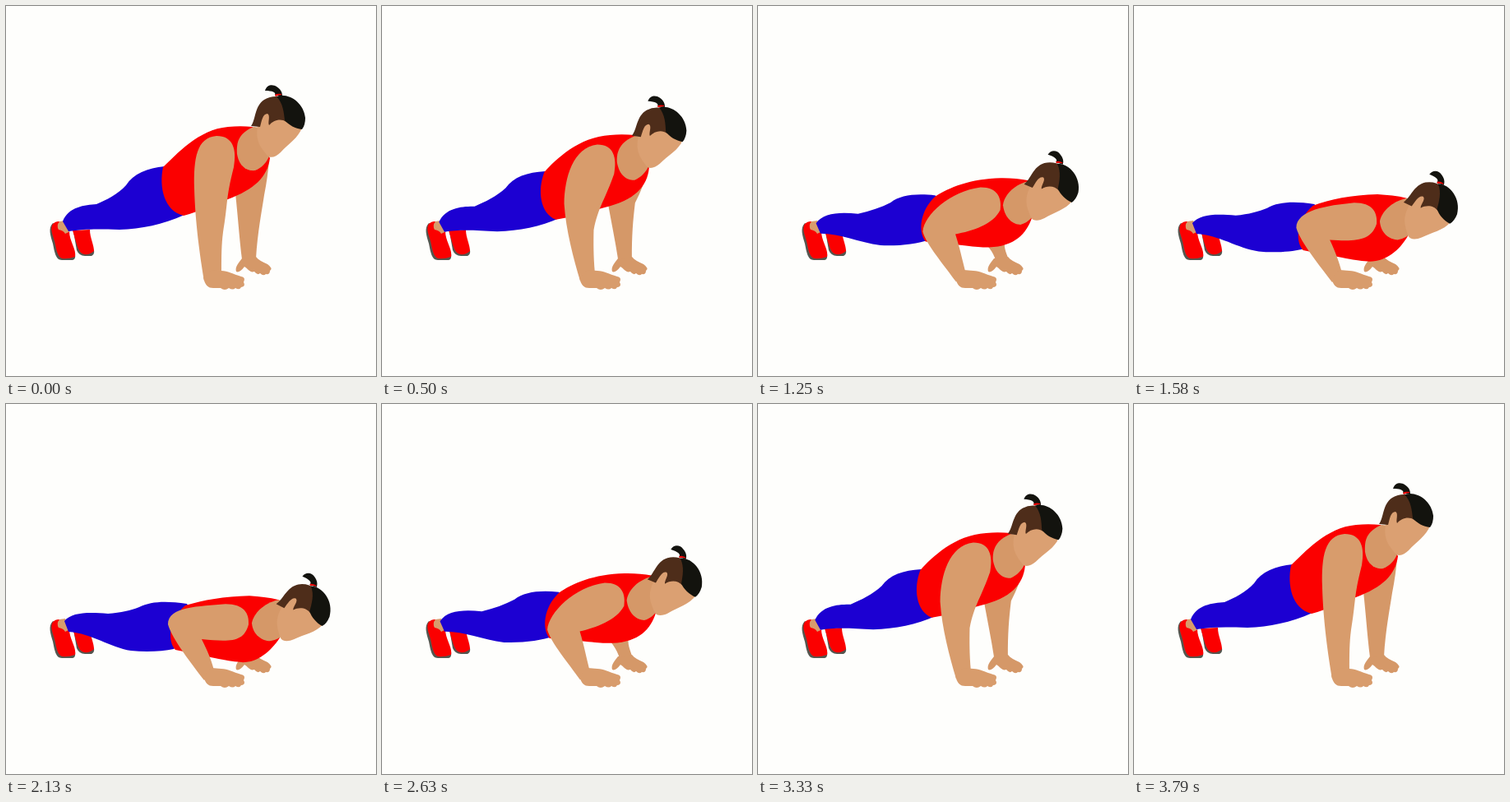
These frames come from a looping animation (450x450 px, 3.83 s). An HTML page:

```html
<!DOCTYPE html>
<html lang="en">
<head>
<meta charset="utf-8">
<title>Push-ups</title>
<style>
  html, body { margin: 0; width: 100%; height: 100%; overflow: hidden; background: #fefefc; }
  svg { display: block; width: 100vw; height: 100vh; }
  .arm { fill: #d89c6c; }
  .face { fill: #dba072; }
  .neck, .far { fill: #d59868; }
  .red { fill: #fb0000; }
  .blue { fill: #1c00d2; }
  .brown { fill: #4e2d1a; }
  .black { fill: #13130e; }
  .sole { fill: #55564f; }
</style>
</head>
<body>
<svg viewBox="0 0 450 450">
  <path id="farArm" class="far"/>
  <path class="far" d="M287 307C283 312 278 318 280 323Q284 325 290 317C295 320 297 325 302 323Q306 328 309 325Q313 329 316 326Q321 327 321 322Q325 319 318 314C312 311 307 309 304 305Z"/>
  <g>
    <path class="sole" d="M82 274L86 297Q89 304 96 304L104 304Q108 302 107 297Z"/>
    <path class="red" d="M81 273L102 272C102 282 107 290 107 298Q102 303 95 302Q89 301 86 290Z"/>
    <path class="sole" d="M57 264C51 270 54 279 57 289C59 298 60 309 68 309L81 309Q85 308 84 302L66 270Z"/>
    <path class="red" d="M57 265Q62 260 67 263L77 274C77 286 86 296 84 305Q75 308 68 307C62 305 61 294 59 286C57 278 53 271 57 265Z"/>
    <path class="arm" d="M65 262Q61 267 64 272Q70 273 72 277L78 274L72 261Z"/>
  </g>
  <path id="legs" class="blue"/>
  <path id="shirt" class="red"/>
  <path id="neck" class="neck"/>
  <g id="head">
    <path class="face" d="M316 128L340 122L360 148C356 160 343 168 334 178C329 183 322 186 318 182C310 172 303 165 306 146Z"/>
    <path class="brown" d="M298 146C304 138 302 122 314 114Q324 108 336 111L341 141C334 136 325 139 320 145C318 142 322 133 318 131C312 131 311 140 309 147Z"/>
    <path class="black" d="M329 110C343 105 362 117 364 136Q364 145 360 150C352 149 344 145 339 139C338 130 337 118 329 110Z"/>
    <path class="black" d="M327 109C329 105 324 103 315 103C317 95 325 95 329 98C334 101 336 105 336 109Z"/>
    <path class="red" d="M327 108Q330 106 335 107L335 108Q331 108 328 110Z"/>
  </g>
  <path id="arm" class="arm"/>
  <path class="arm" d="M240 330C242 340 246 343 252 343L261 343Q266 347 271 343Q276 346 279 343Q284 346 286 342Q292 341 289 336Q292 330 286 329C276 326 270 322 262 322L250 321Z"/>
</svg>
<script>
const LOOP = 3830, STEPS = 92;
const MID = 0.466, LOW = 0.975; // depth of the second and third pose

// Each part in three poses: arms straight, halfway, near the floor.
const poses = {
  legs: [
    "M69 262C76 244 96 242 110 241C122 236 136 229 146 218C155 204 172 197 193 195L222 225L217 254C190 266 165 271 138 272C110 271 95 271 76 274Z",
    "M70 264C78 249 98 247 118 249C132 244 146 238 158 230C168 219 186 215 209 216L228 240L213 270C195 278 170 282 145 282C118 279 95 274 76 276Z",
    "M71 264C80 253 100 253 124 255C140 254 152 251 162 247C176 240 194 239 220 243L235 270L204 298C190 301 170 302 152 300C126 296 105 279 76 277Z"
  ],
  shirt: [
    "M191 196C207 181 234 150 270 147C280 146 290 146 300 147L321 185C318 208 302 223 270 235C255 240 235 250 216 255C192 249 186 220 191 196Z",
    "M209 217C222 203 250 184 290 183C302 182 312 183 322 184L331 227C328 249 314 266 275 270C262 272 245 272 205 273C193 262 194 236 209 217Z",
    "M218 245C240 238 265 234 296 233C308 234 320 235 332 238L333 284C322 301 306 314 288 314C270 313 255 309 206 299C196 288 198 262 218 245Z"
  ],
  neck: [
    "M301 147C283 155 280 165 281 180C284 198 296 201 303 200C311 197 317 190 320 183L330 150Z",
    "M320 186C302 192 294 205 294 216C297 234 307 240 315 240C323 237 328 231 331 226L344 190Z",
    "M331 238C313 242 301 255 299 266C300 281 312 288 321 288C328 287 331 285 334 283L345 240Z"
  ],
  arm: [
    "M241 334C236 305 230 262 229 222C228 185 232 160 256 158C276 158 281 174 277 196C267 235 270 240 264 275C262 290 262 305 262 324Z",
    "M241 335C228 312 212 288 208 268C210 245 233 200 270 195C290 195 294 210 291 226C280 246 256 258 246 272C249 290 250 305 254 324Z",
    "M241 336C226 316 202 286 197 268C197 246 235 246 267 243C290 243 296 255 295 268C289 290 272 289 238 286C245 300 250 312 253 324Z"
  ],
  farArm: [
    "M279 228C282 255 284 285 287 308L304 307C306 275 311 250 314 230C317 215 319 200 320 187L290 200Z",
    "M270 262C276 278 284 290 288 309L304 307C301 290 298 280 300 262C310 255 322 240 326 230L290 235Z",
    "M280 300C284 303 288 306 291 311L305 308C304 305 303 303 306 300C312 294 318 290 322 286L290 290Z"
  ],
  head: [
    "translate(331 109) rotate(0) translate(-331 -109)",
    "translate(355 157.5) rotate(11) translate(-331 -109)",
    "translate(373 221) rotate(22) translate(-331 -109)"
  ]
};

const NUM = /-?\d+(\.\d+)?/g;
const parts = Object.entries(poses).map(([id, list]) => ({
  node: document.getElementById(id),
  attr: id === "head" ? "transform" : "d",
  shape: list[0],
  nums: list.map(s => s.match(NUM).map(Number))
}));

// cubic-bezier(.42, 0, .58, 1), solved by bisection
function easeInOut(x) {
  let lo = 0, hi = 1, t;
  for (let i = 0; i < 24; i++) {
    t = (lo + hi) / 2;
    const bx = 1.26 * (1 - t) ** 2 * t + 1.74 * (1 - t) * t * t + t ** 3;
    if (bx < x) lo = t; else hi = t;
  }
  return t * t * (3 - 2 * t);
}

// Quadratic through the three poses.
function blend(a, b, c, d) {
  const s1 = (b - a) / MID, s2 = (c - b) / (LOW - MID);
  return a + d * (s1 + (s2 - s1) / LOW * (d - MID));
}

function draw(ms) {
  const step = Math.floor((ms % LOOP) / LOOP * STEPS + 0.1);
  const depth = easeInOut(1 - Math.abs(1 - 2 * step / STEPS));
  for (const { node, attr, shape, nums: [a, b, c] } of parts) {
    let i = 0;
    node.setAttribute(attr, shape.replace(NUM, () => {
      const v = blend(a[i], b[i], c[i], depth);
      i++;
      return v.toFixed(2);
    }));
  }
}

let start;
function tick(now) {
  start ??= now;
  draw(now - start);
  requestAnimationFrame(tick);
}
draw(0);
requestAnimationFrame(tick);
</script>
</body>
</html>
```
